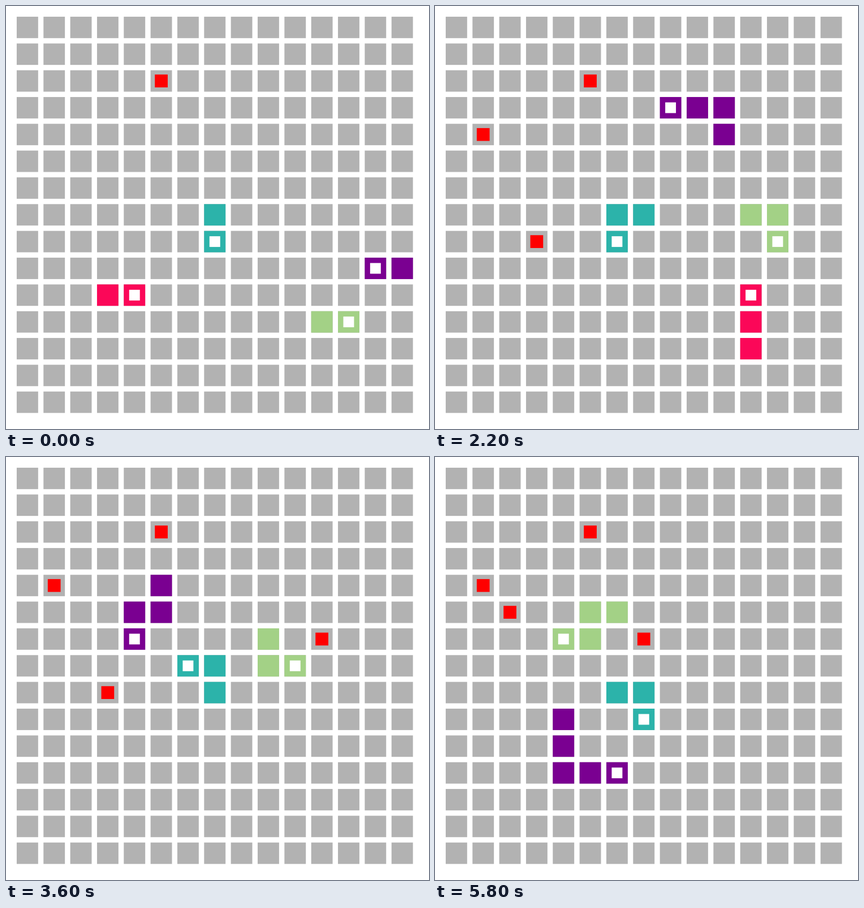
Recreate the animation shown at these times as an HTML page with a canvas. Size 748 by 748 pixels, loop 6 s.

```html
<!DOCTYPE html>
<html lang="en">
<head>
<meta charset="utf-8">
<title>Snakes on a grid</title>
<style>
html, body { margin: 0; width: 100%; height: 100%; overflow: hidden; background: #fff; }
canvas { display: block; width: 748px; height: 748px; }
</style>
</head>
<body>
<canvas id="stage" width="748" height="748"></canvas>
<script>
const SIZE = 748, GRID = 15, TICK = 200, TICKS = 30;
const UNIT = SIZE / 79; // cell 4, gap 1, margin 2
const ctx = document.getElementById('stage').getContext('2d');

const DIRS = { U: [0, -1], D: [0, 1], L: [-1, 0], R: [1, 0] };

// Each snake takes one move per tick and grows on the tick after a meal.
const snakes = [
  { color: '#2cb3aa', start: [7, 7], moves: 'DRRUULDDLULDRULDRULDRURDLULDRD', meals: [] },
  { color: '#7a0091', start: [14, 9], moves: 'LUUULLUULULLLLLDDLDLLDDRRDDDRR', meals: [8, 23] },
  { color: '#fb0758', start: [3, 10], moves: 'RRRRRRDDRRUULUU', meals: [] },
  { color: '#a3d186', start: [11, 11], moves: 'RULUUURULDRDLULULDRRUULLLLLLDL', meals: [20] }
];

// column, row, first tick, tick when eaten
const foods = [
  [5, 2, 0, TICKS],
  [10, 4, 5, 8],
  [3, 8, 7, 23],
  [1, 4, 11, TICKS],
  [11, 6, 17, 20],
  [7, 6, 22, TICKS],
  [2, 5, 27, TICKS]
];

for (const snake of snakes) {
  snake.path = [snake.start];
  for (const move of snake.moves) {
    const [x, y] = snake.path[snake.path.length - 1];
    const [dx, dy] = DIRS[move];
    snake.path.push([x + dx, y + dy]);
  }
}

// Square of the given size, centred in a cell.
function square(col, row, size, color) {
  const at = i => (4 + 5 * i - size / 2) * UNIT;
  ctx.fillStyle = color;
  ctx.fillRect(at(col), at(row), size * UNIT, size * UNIT);
}

function drawSnake({ color, path, moves, meals }, tick) {
  if (tick >= moves.length) return;
  const length = 3 + meals.filter(meal => meal < tick).length;
  const head = tick + 1;
  for (let i = Math.max(0, head - length + 1); i <= head; i++) {
    square(...path[i], 4, color);
  }
  square(...path[head], 2, '#fff');
}

function draw(tick) {
  ctx.fillStyle = '#fff';
  ctx.fillRect(0, 0, SIZE, SIZE);
  for (let row = 0; row < GRID; row++) {
    for (let col = 0; col < GRID; col++) square(col, row, 4, '#b2b2b2');
  }
  for (const [col, row, from, to] of foods) {
    if (tick >= from && tick < to) square(col, row, 2.4, '#f00');
  }
  for (const snake of snakes) drawSnake(snake, tick);
}

const began = performance.now();
function loop() {
  draw(Math.floor((performance.now() - began) / TICK) % TICKS);
  requestAnimationFrame(loop);
}
loop();
</script>
</body>
</html>
```
